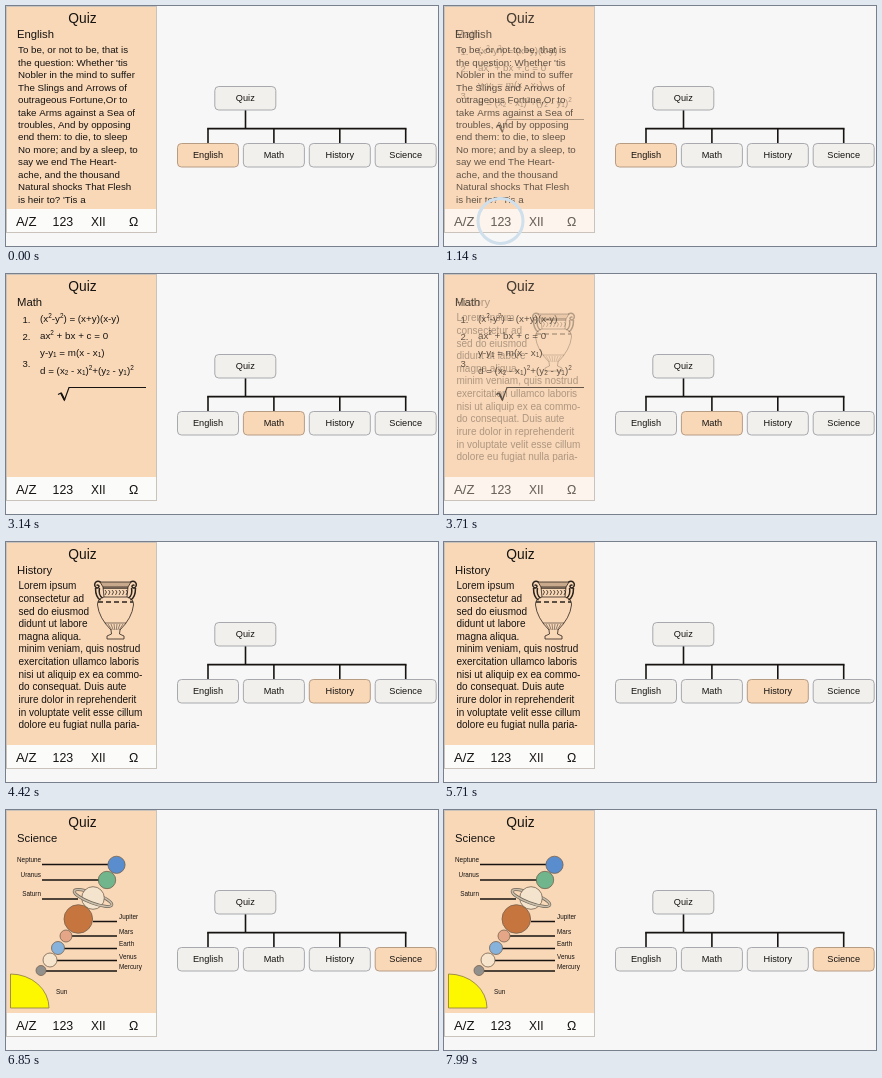
Write an HTML page with a canvas that moves like this. It is 432 px wide and 240 px high and loops after 8.14 s.

```html
<!DOCTYPE html>
<html lang="en">
<head>
<meta charset="utf-8">
<title>Quiz</title>
<style>
html, body { margin: 0; width: 100%; height: 100%; overflow: hidden; background: #f7f7f7; }
canvas { display: block; width: 432px; height: 240px; }
</style>
</head>
<body>
<canvas id="stage" width="432" height="240"></canvas>
<script>
const ctx = document.getElementById('stage').getContext('2d');
const LOOP = 8140, FADE = 430;
const FADE_STARTS = [1000, 3570, 6180];
const PEACH = '#f9d8b8', INK = '#161310';
const TOPICS = ['English', 'Math', 'History', 'Science'];

const ENGLISH = [
  'To be, or not to be, that is', "the question: Whether 'tis", 'Nobler in the mind to suffer',
  'The Slings and Arrows of', 'outrageous Fortune,Or to', 'take Arms against a Sea of',
  'troubles, And by opposing', 'end them: to die, to sleep', 'No more; and by a sleep, to',
  'say we end The Heart-', 'ache, and the thousand', 'Natural shocks That Flesh', "is heir to? 'Tis a"
];
const HISTORY = [
  'Lorem ipsum', 'consectetur ad', 'sed do eiusmod', 'didunt ut labore', 'magna aliqua.',
  'minim veniam, quis nostrud', 'exercitation ullamco laboris', 'nisi ut aliquip ex ea commo-',
  'do consequat. Duis aute', 'irure dolor in reprehenderit', 'in voluptate velit esse cillum',
  'dolore eu fugiat nulla paria-'
];

function text(str, x, y, size, align = 'left') {
  ctx.font = `${size}px "Liberation Sans", Arial, sans-serif`;
  ctx.textAlign = align;
  ctx.fillStyle = INK;
  ctx.fillText(str, x, y);
}

function lines(list, x, y, pitch, size) {
  list.forEach((line, i) => text(line, x, y + i * pitch, size));
}

// ^ raises and _ lowers the character that follows
function formula(str, x, y) {
  for (const [part] of str.matchAll(/[\^_].|[^\^_]+/g)) {
    const shift = { '^': -3.6, '_': 1.4 }[part[0]];
    const plain = shift === undefined;
    const run = plain ? part : part.slice(1);
    text(run, x, y + (plain ? 0 : shift), plain ? 9.8 : 6.4);
    x += ctx.measureText(run).width;
  }
}

function stroke(points, width = 1, color = INK) {
  ctx.beginPath();
  points.forEach(([x, y]) => ctx.lineTo(x, y));
  ctx.lineWidth = width;
  ctx.strokeStyle = color;
  ctx.stroke();
}

function paint(path, fill, line, width = 0.8) {
  if (fill) { ctx.fillStyle = fill; ctx.fill(path); }
  if (line) { ctx.strokeStyle = line; ctx.lineWidth = width; ctx.stroke(path); }
}

function disc(x, y, r, fill, line = '#75614f', width) {
  const path = new Path2D();
  path.arc(x, y, r, 0, Math.PI * 2);
  paint(path, fill, line, width);
}

function drawEnglish() {
  lines(ENGLISH, 12, 47.3, 12.45, 9.75);
}

function drawMath() {
  [49, 66, 93].forEach((y, i) => text(`${i + 1}.`, 16.5, y, 9.5));
  formula('(x^2-y^2) = (x+y)(x-y)', 34, 47.5);
  formula('ax^2 + bx + c = 0', 34, 65);
  formula('y-y_1 = m(x - x_1)', 34, 82);
  formula('d = (x_2 - x_1)^2+(y_2 - y_1)^2', 34, 100);
  stroke([[52, 120.5], [55, 119], [58.5, 126], [63, 113.5], [140, 113.5]], 1.2);
  stroke([[55, 119], [58.5, 126]], 1.8);
}

function drawVase() {
  const dark = '#2b231c';
  paint(new Path2D('M97 45 L98 55 Q91 57 91.5 63 Q93 76 105 88 L105.5 92 L101 94 V97 H118 V94 L113.5 92 L114 88 Q126 76 127.5 63 Q128 57 121 55 L122 45 Z'), null, dark, 0.8);
  paint(new Path2D('M94 40 H125 L122 45 H97 Z'), '#c9a98b', dark, 0.8);
  for (const side of [-1, 1]) {
    ctx.save();
    ctx.translate(109.5, 0);
    ctx.scale(side, 1);
    paint(new Path2D('M15 40 C21 37 23 45 18 46 C15 45 17 42 19 43.5 M20 46 C20 52 19 56 15 58 M16 46 C17 51 16 54 13 56'), null, dark, 1.5);
    ctx.restore();
  }
  for (let x = 99; x < 122; x += 3.5) {
    stroke([[x, 48], [x + 1.5, 50], [x, 53]], 0.8, dark);
  }
  stroke([[97, 46.5], [122, 46.5]], 0.7, dark);
  stroke([[98, 55], [121, 55]], 0.8, dark);
  ctx.setLineDash([5, 3]);
  stroke([[92, 60], [127, 60]], 1.3, dark);
  ctx.setLineDash([]);
  stroke([[99, 81], [120, 81]], 0.6, dark);
  for (let x = 102; x < 119; x += 3) stroke([[x, 82], [109.5 + (x - 109.5) * 0.5, 88]], 0.5, dark);
}

function drawHistory() {
  lines(HISTORY, 12.5, 47.3, 12.62, 10);
  drawVase();
}

function saturn(x, y) {
  const ring = (from, to) => {
    const path = new Path2D();
    path.ellipse(x, y, 20, 5, 0.36, from, to);
    paint(path, null, '#6e6558', 3);
    paint(path, null, '#c9bda9', 1.6);
  };
  ring(Math.PI, Math.PI * 2);
  disc(x, y, 11.3, '#f4e4cd');
  ring(0, Math.PI);
}

function drawScience() {
  // name, label baseline, line y, line start, line end
  const labels = [
    ['Neptune', 52, 54.5, 36, 103], ['Uranus', 67, 70, 36, 93], ['Saturn', 86, 89, 36, 72],
    ['Jupiter', 109, 111.5, 87, 111], ['Mars', 124, 126, 66, 111], ['Earth', 136, 138.5, 58, 111],
    ['Venus', 149, 150.5, 51, 111], ['Mercury', 159, 161, 40, 111]
  ];
  labels.forEach(([name, base, y, from, to], i) => {
    const left = i < 3;
    text(name, left ? 35 : 113, base, 6.35, left ? 'right' : 'left');
    stroke([[from, y], [to, y]], 1.5);
  });
  disc(110.5, 54.8, 8.6, '#598dcd');
  disc(101, 70, 8.7, '#70b58c');
  saturn(87, 88);
  disc(72.3, 109, 14.3, '#c6753f');
  disc(60, 126, 6, '#e5a587');
  disc(52, 138, 6.5, '#86b2dc');
  disc(44, 150, 7, '#f6e5cc');
  disc(35, 160.5, 5, '#92908d');
  paint(new Path2D('M4.5 164 A38.5 34 0 0 1 43 198 H4.5 Z'), '#fdf800', '#8a7a3c');
  text('Sun', 50, 184, 6.35);
}

const PAGES = [drawEnglish, drawMath, drawHistory, drawScience];

function drawNav() {
  ctx.fillStyle = '#fbfbfa';
  ctx.fillRect(0, 203, 150, 23);
  text('A/Z', 10, 220, 13.2);
  text('123', 46.5, 220, 12.4);
  text('XII', 85, 220, 12);
  text('Ω', 123, 220, 12.4);
}

function drawPage(index, alpha) {
  ctx.globalAlpha = alpha;
  ctx.fillStyle = PEACH;
  ctx.fillRect(0, 0, 150, 226);
  text('Quiz', 76.5, 17, 13.8, 'center');
  text(TOPICS[index], 11, 31.5, 11.3);
  PAGES[index]();
  drawNav();
  ctx.globalAlpha = 1;
}

function drawTap(time) {
  const alpha = Math.min((time - 700) / 200, (1430 - time) / 250, 1);
  if (alpha <= 0) return;
  ctx.globalAlpha = alpha;
  disc(56.5, 215, 22.5, null, '#cfdfec', 3);
  ctx.globalAlpha = 1;
}

function node(label, x, y, active) {
  const box = new Path2D();
  box.roundRect(x, y, 61, 23.5, 4);
  paint(box, active ? PEACH : '#f1f0ed', active ? '#b79c84' : '#a8a9ae', 1);
  text(label, x + 30.5, y + 14.7, 9.2, 'center');
}

function drawTree(active) {
  const railY = 122.6, weight = 1.6;
  stroke([[239.5, 104], [239.5, railY]], weight);
  stroke([[201.2, railY], [400.5, railY]], weight);
  node('Quiz', 208.8, 80.5, false);
  TOPICS.forEach((topic, i) => {
    const x = 171.5 + i * 65.9;
    stroke([[x + 30.5, railY], [x + 30.5, 137]], weight);
    node(topic, x, 137.5, i === active);
  });
}

function draw(time) {
  const settled = FADE_STARTS.filter(start => time >= start + FADE).length;
  const fade = (time - FADE_STARTS[settled]) / FADE;
  ctx.fillStyle = '#f7f7f7';
  ctx.fillRect(0, 0, 432, 240);
  drawPage(settled, 1);
  if (fade > 0) drawPage(settled + 1, fade);
  ctx.strokeStyle = '#c9c3bc';
  ctx.lineWidth = 1;
  ctx.strokeRect(0.5, 0.5, 150, 226);
  drawTap(time);
  drawTree(settled);
}

const begin = performance.now();
function tick() {
  draw((performance.now() - begin) % LOOP);
  requestAnimationFrame(tick);
}
tick();
</script>
</body>
</html>
```
